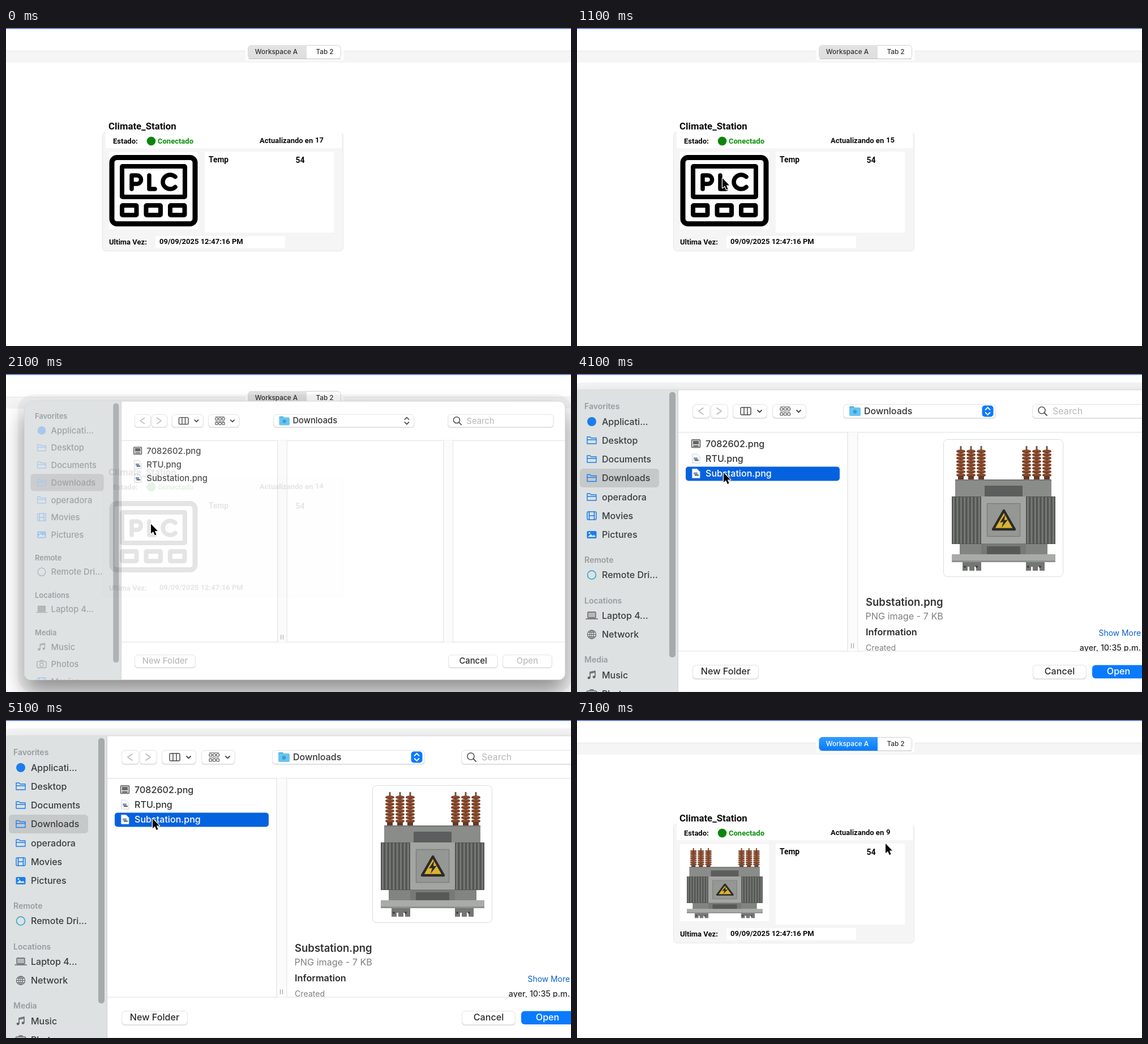
Animation, 998 px wide and 561 px high, one loop 8.1 s. Source, as an HTML page with a canvas:

```html
<!DOCTYPE html>
<html lang="en">
<head>
<meta charset="utf-8">
<title>Choosing a device picture</title>
<style>
html, body { margin: 0; width: 100%; height: 100%; overflow: hidden; background: #fff; }
canvas { display: block; width: 998px; height: 561px; }
</style>
</head>
<body>
<canvas width="998" height="561"></canvas>
<script>
const ctx = document.querySelector('canvas').getContext('2d');
const UI = 'Inter, sans-serif', CARD = 'Roboto, sans-serif';
const LOOP = 8100;
const BLUE = '#0a7aff';

// Pointer tip for each step; the first step lasts 100 ms, the others 1 s.
const pointer = [null, [193, 320], [257, 265], [256, 264.5], [259, 183],
  [259, 174], [259, 174], [259, 174], [545, 218]];

function box(x, y, w, h, fill, r = 0, stroke, lw = 1) {
  ctx.beginPath();
  ctx.roundRect(x, y, w, h, r);
  if (fill) { ctx.fillStyle = fill; ctx.fill(); }
  if (stroke) { ctx.strokeStyle = stroke; ctx.lineWidth = lw; ctx.stroke(); }
}

function disc(x, y, r, fill, stroke, lw = 1.3, ry = r) {
  ctx.beginPath();
  ctx.ellipse(x, y, r, ry, 0, 0, 7);
  if (fill) { ctx.fillStyle = fill; ctx.fill(); }
  if (stroke) { ctx.strokeStyle = stroke; ctx.lineWidth = lw; ctx.stroke(); }
}

function path(d, stroke, lw = 1.5, fill) {
  const p = new Path2D(d);
  if (fill) { ctx.fillStyle = fill; ctx.fill(p); }
  if (stroke) {
    ctx.strokeStyle = stroke;
    ctx.lineWidth = lw;
    ctx.lineCap = ctx.lineJoin = 'round';
    ctx.stroke(p);
  }
}

// y is the middle of the capitals
function text(s, x, y, size = 16, color = '#333', weight = 500, align = 'left', font = UI) {
  ctx.font = `${weight} ${size}px ${font}`;
  ctx.fillStyle = color;
  ctx.textAlign = align;
  ctx.fillText(s, x, y + size * 0.36);
}

const label = (s, x, y, size = 13, color = '#0a0a0a') => text(s, x, y, size, color, 700, 'left', CARD);

function drawPlc() {
  box(187, 228.5, 147, 117, null, 9, '#000', 9);
  box(205, 244, 111, 54, null, 1, '#000', 8);
  for (const x of [205, 247.5, 290]) box(x, 313, 25.5, 17, null, 1, '#000', 8);
  path('M222 284V260H231a7.5 7.5 0 0 1 0 15H222M253 260V284H263', '#000', 7.5);
  path('M299 262.5a13 12.5 0 1 0 0 18', '#000', 7.5);
}

function drawTransformer() {
  for (const x of [678, 696, 714, 794, 812, 830]) {
    box(x - 1.5, 127, 3, 58, '#6f5848', 1);
    for (let i = 0; i < 8; i++) {
      disc(x, 136.5 + i * 6, 8, '#6a3822', null, 0, 3);
      disc(x, 135.5 + i * 6, 7.5, '#8d4b2c', null, 0, 2);
    }
    box(x - 5, 181, 10, 5, '#63392a');
  }
  box(668, 186, 170, 31, '#8a8c8a');
  box(668, 186, 170, 2, '#747674');
  box(720, 197, 67, 20, '#5c5e5d');
  box(676, 298, 155, 21, '#828482');
  box(714, 298, 79, 21, '#777977');
  box(724, 304, 59, 15, '#575957');
  for (const x of [662, 793]) {
    box(x, 216, 52, 84, '#535553');
    for (let i = 0; i < 8; i++) box(x + 2 + i * 6.4, 217, 3, 82, '#767876');
  }
  box(714, 216, 79, 83, '#a3a5a3');
  box(724.5, 228.5, 58, 58, '#959795', 0, '#7d7f7d', 1.5);
  path('M754 241L773 274H735Z', '#2b2b29', 4.5, '#dcb230');
  path('M756 248L747 262L753 261L750 271L761 257L755 258Z', null, 0, '#2b2b29');
  box(662, 318, 183, 14, '#a9aba8');
  box(662, 329, 183, 3, '#8f918f');
  for (const x of [681, 793]) {
    box(x, 332, 33, 8, '#747674');
    for (const dx of [0, 12, 24]) box(x + dx, 337, 9, 10, '#747674');
    for (const dx of [4, 25]) disc(x + dx, 340, 2, '#3f413f');
  }
}

function drawPage(step) {
  const swapped = step > 6;
  box(0, 40, 998, 21, '#f5f5f5');
  box(0, 40, 998, 1, '#e9e9e9');
  box(423, 28, 173, 29, '#fff');
  box(427.5, 30.5, 164, 24, '#fff', 6, '#d2d2d2');
  box(428, 54, 163, 1, '#bdbdbd', 1);
  const tab = ctx.createLinearGradient(0, 30, 0, 54);
  tab.addColorStop(0, swapped ? '#349aff' : '#e3e3e3');
  tab.addColorStop(1, swapped ? '#077bfb' : '#dedede');
  box(427.5, 30, 103.5, 24, tab, [6, 0, 0, 6]);
  text('Workspace A', 477.5, 42, 11.8, swapped ? '#fff' : '#333', 500, 'center');
  text('Tab 2', 563, 42, 11.8, '#333', 500, 'center');

  label('Climate_Station', 181, 173, 16.8);
  box(170.5, 183.5, 425, 210, '#f5f5f5', 6, '#e7e7e7');
  box(176, 182, 417, 30, '#fff');
  box(182, 219, 157, 136, '#fff');
  box(351, 218, 228, 143, '#fff');
  box(264, 367, 229, 21, '#fff');
  label('Estado:', 189, 199);
  disc(256.5, 199.5, 7.8, '#0a850a');
  label('Conectado', 268, 199, 13, '#079207');
  label('Actualizando en', 448, 198);
  label(17 - step, 546, 197, 13);
  label('Temp', 358, 232, 13.8);
  label('54', 511.5, 233, 14);
  label('Ultima Vez:', 182, 377.5);
  label('09/09/2025 12:47:16 PM', 271, 376.5);

  if (swapped) {
    ctx.save();
    ctx.translate(194, 226);
    ctx.scale(0.732, 0.561);
    ctx.translate(-662, -127);
    drawTransformer();
    ctx.restore();
  } else drawPlc();
}

const icons = {
  dot: (y, c) => disc(26, y, 8, c),
  ring: (y, c) => disc(26, y, 7.5, null, c, 1.5),
  folder: (y, c) => path(`M18 ${y - 6}h5l2 2h9v10h-16zM18 ${y - 1}h16`, c, 1.4),
  film(y, c) {
    box(18, y - 7, 16, 14, null, 2, c, 1.5);
    path(`M21.5 ${y - 7}v14M30.5 ${y - 7}v14M21.5 ${y}h9`, c, 1.7);
  },
  picture(y, c) {
    box(17.5, y - 6.5, 17, 13, c, 2);
    path(`M19 ${y + 4}l5 -5l4 3l2 -2l3 4z`, null, 0, '#e4e9ee');
    disc(22, y - 3, 1.5, '#e4e9ee');
  },
  laptop(y, c) {
    box(19, y - 6, 14, 10, '#b5b7b9', 1, c, 1.3);
    path(`M16 ${y + 6}h20`, c, 1.7);
  },
  globe(y, c) {
    disc(26, y, 7.5, null, c, 1.2);
    disc(26, y, 3.5, null, c, 1.1, 7.5);
    path(`M19 ${y}h14M20 ${y - 4}h12M20 ${y + 4}h12M26 ${y - 7}v14`, c, 1);
  },
  note(y, c) {
    path(`M23 ${y + 5}v-10l9 -2v10M23 ${y - 3}l9 -2`, c, 1.5);
    disc(21, y + 5, 2.3, c);
    disc(30, y + 3.5, 2.3, c);
  },
  camera(y, c) {
    box(17, y - 5, 18, 12, null, 3, c, 1.4);
    disc(26, y + 1, 3.4, null, c, 1.3);
    path(`M23 ${y - 7}h6`, c, 1.5);
  }
};

function drawSidebar(dim) {
  const ink = dim ? '#a0a3a5' : '#3b3d3f';
  const tint = dim ? '#a6c9ea' : '#1b7eec';
  const grey = dim ? '#abaeb0' : '#5f6264';
  const lift = dim ? 33 : 0;
  const head = (s, y) => text(s, 13, y, 14, dim ? '#9da0a2' : '#999c9f', 600);
  const row = (icon, s, y, c = tint) => { icons[icon](y, c); text(s, 44, y, 16, ink); };
  box(-7, 28, 185, 533, dim ? '#dfe2e3' : '#dde1e2', [12, 0, 0, 12]);
  box(178, 28, 1, 533, '#cdcfd0');
  box(5, 167, 140, 33, dim ? '#cacccd' : '#c6c9ca', 6);
  head('Favorites', 57);
  row('dot', 'Applicati...', 84);
  row('folder', 'Desktop', 117);
  row('folder', 'Documents', 150);
  row('folder', 'Downloads', 183.5);
  row('folder', 'operadora', 217);
  row('film', 'Movies', 250);
  row('picture', 'Pictures', 283.5);
  head('Remote', 328);
  row('ring', 'Remote Dri...', 354.5, dim ? '#b3b7ba' : '#23a3d0');
  head('Locations', 399.5);
  row('laptop', 'Laptop 4...', 426, grey);
  if (!dim) row('globe', 'Network', 459.5, grey);
  head('Media', 504 - lift);
  row('note', 'Music', 531 - lift, grey);
  row('camera', 'Photos', 564 - lift, grey);
  if (dim) row('film', 'Movies', 564, tint);
  box(163, 32, 11, dim ? 496 : 468, dim ? '#b1b2b4' : '#a7a9aa', 5);
}

const field = (x, y, w, h) => {
  box(x, y + 1, w, h, '#ddd', 6);
  box(x + 0.5, y + 0.5, w - 1, h - 1, '#fff', 6, '#e2e2e2');
};

function button(s, x, w, ink, fill) {
  if (fill) box(x + 1, 513.5, w, 23.5, fill, 6);
  else field(x, 513, w, 25);
  text(s, x + w / 2, 524.6, 16.1, ink, 500, 'center');
}

function drawToolbar(dim) {
  const ink = '#4a4a4a';
  field(204, 53, 31, 25);
  field(236, 53, 31, 25);
  path('M223 60l-8 5.5l8 5.5M247 60l8 5.5l-8 5.5', '#b9b9b9', 1.6);
  field(275, 53, 61, 25);
  field(345, 53, 60, 25);
  box(289, 59, 18, 13, null, 2, ink, 1.5);
  path('M295 59v13M301 59v13', ink, 1.5);
  path('M319 64l3.5 3.5l3.5 -3.5M388 64l3.5 3.5l3.5 -3.5', ink, 1.9);
  for (const y of [57, 66]) {
    box(359, y, 17, 1, '#777');
    for (const x of [359, 365.5, 372]) box(x, y + 2.5, 4.5, 4.5, null, 1, ink, 1.2);
  }
  field(470, 53, 270, 25);
  box(481, 57, 9, 5, '#4cadde', 2);
  box(481, 59, 20, 15, '#67c4f2', 2);
  disc(491, 66.5, 3.3, '#389dd2');
  text('Downloads', 507, 65, 16);
  if (!dim) box(715.5, 55.5, 20, 20, BLUE, 5);
  path('M721.5 63l4 -4l4 4M721.5 68l4 4l4 -4', dim ? ink : '#fff', 1.8);
  field(804, 53, 203, 25);
  disc(821, 64, 6, null, '#555', 1.7);
  path('M825.5 68.5l4.5 4.5', '#555', 1.9);
  text('Search', 840, 65.5, 16, '#b7b7b7', 400);
}

function drawFiles(dim, chosen) {
  if (chosen) box(192, 163.5, 272, 25, '#0562de', 5);
  ['7082602.png', 'RTU.png', 'Substation.png'].forEach((name, i) => {
    const y = 123 + i * 26.2;
    if (i === 0) {
      box(202.5, 116, 15, 13.5, '#ddd', 1, '#555', 1.4);
      box(205, 118, 10, 6, '#666');
      path('M206 127h8', '#555', 1.8);
    } else {
      path(`M204 ${y - 8}h8l5 5v11h-13z`, '#d5d5d5', 1, '#fafafa');
      box(206, y - 2, 7, 4, '#7c9cc0', 1);
      box(208, y + 2, 7, 2, '#555');
    }
    text(name, 227, y, 16.1, chosen && i === 2 ? '#fff' : dim ? '#505050' : '#333');
  });
}

function drawPreview() {
  ctx.save();
  ctx.beginPath();
  ctx.rect(497, 104, 501, 385);
  ctx.clip();
  box(647.5, 115.5, 211, 242, '#fff', 7, '#dcdcdc');
  drawTransformer();
  text('Substation.png', 510, 402.6, 18.5, '#333', 600);
  text('PNG image - 7 KB', 509.5, 427, 16.2, '#808080', 400);
  text('Information', 510, 455.6, 16.3, '#2b2b2b', 600);
  text('Show More', 996, 456.5, 13.9, '#0a60c8', 400, 'right');
  text('Created', 510, 482.5, 14.2, '#808080', 400);
  text('ayer, 10:35 p.m.', 996, 482.5, 14.3, '#2b2b2b', 500, 'right');
  ctx.restore();
}

function drawDialog(step) {
  const dim = step === 3, chosen = step > 4;
  ctx.save();
  if (dim) {
    ctx.translate(39, 22.2);
    ctx.scale(0.922, 0.922);
  }
  box(-20, 15, 1062, 570, 'rgba(0,0,0,.035)', 30);
  ctx.shadowColor = 'rgba(0,0,0,.42)';
  ctx.shadowBlur = 38;
  ctx.shadowOffsetY = 22;
  box(-7, 28, 1036, 533, '#fff', 12);
  ctx.shadowColor = 'transparent';
  box(-7, 28, 1036, 533, '#fff', 12, '#d3d3d3');
  ctx.clip();
  drawSidebar(dim);
  drawToolbar(dim);
  for (const y of [102.5, 488.5]) box(179, y, 850, 1, '#dedede');
  for (const x of chosen ? [478] : [478, 796]) {
    box(x, 103, 18, 386, '#fbfbfb');
    box(x - 0.5, 103, 1, 386, '#dcdcdc');
    box(x + 17.5, 103, 1, 386, '#e2e2e2');
  }
  path('M484.5 475.5v8M488.5 475.5v8', '#999', 1);
  drawFiles(dim, chosen);
  if (chosen) drawPreview();
  button('New Folder', 204, 117, dim ? '#bcbcbc' : '#2b2b2b');
  button('Cancel', 805, 95, '#2b2b2b');
  button('Open', 909, 95, chosen ? '#fff' : '#bdbdbd', chosen && BLUE);
  ctx.restore();
}

function drawPointer([x, y]) {
  ctx.save();
  ctx.translate(x, y);
  const arrow = 'M0 0V17L4 13.5L6.8 20L9.6 18.8L6.9 12.5H12Z';
  path(arrow, '#fff', 2.4);
  path(arrow, null, 0, '#050505');
  ctx.restore();
}

function draw(now) {
  const t = now % LOOP;
  const step = t < 100 ? 0 : 1 + Math.floor((t - 100) / 1000);
  box(0, 0, 998, 561, '#fff');
  drawPage(step);
  if (step > 2 && step < 7) drawDialog(step);
  if (step === 3) {
    // the page still shows through while the dialog fades in
    ctx.save();
    ctx.beginPath();
    ctx.rect(0, 62, 998, 499);
    ctx.clip();
    ctx.globalAlpha = 0.1;
    ctx.globalCompositeOperation = 'multiply';
    drawPage(step);
    ctx.restore();
  }
  box(0, 0, 998, 1.4, '#4a68d4');
  if (pointer[step]) drawPointer(pointer[step]);
  requestAnimationFrame(draw);
}
requestAnimationFrame(draw);
</script>
</body>
</html>
```
